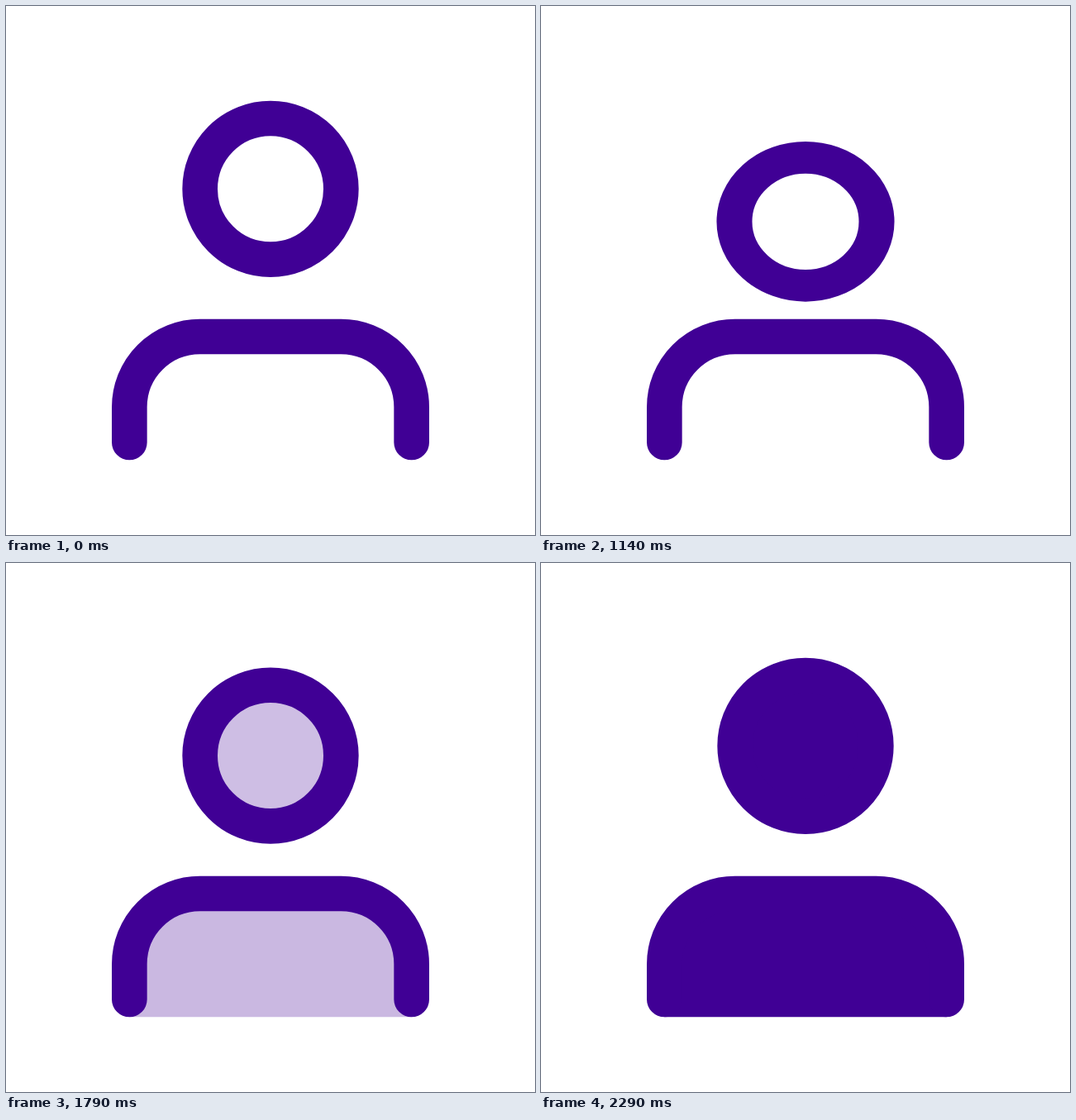
An HTML page for the animation above (2370 ms loop, 640x640 px).

```html
<!DOCTYPE html>
<html lang="en">
<head>
<meta charset="utf-8">
<title>Person icon</title>
<style>
  html, body { margin: 0; height: 100%; overflow: hidden; background: #fff; }
  svg { display: block; width: 100%; height: 100%; }
  path, circle { stroke-width: 42.667; stroke-linecap: round; stroke-linejoin: round; }
</style>
</head>
<body>
<svg viewBox="0 0 640 640" fill="#400095" stroke="#400095">
  <path id="torso" stroke="none" d="M149.33 549.33V485.33A85.33 85.33 0 0 1 234.67 400H405.33A85.33 85.33 0 0 1 490.67 485.33V549.33Z"/>
  <path id="shoulders" fill="none"/>
  <circle id="head" r="85.333"/>
</svg>
<script>
const LOOP = 2370, FPS = 14;
const [torso, shoulders, head] = ['torso', 'shoulders', 'head'].map(id => document.getElementById(id));

const progress = (t, from, to) => Math.min(1, Math.max(0, (t - from) / (to - from)));
const ease = p => p < 0.5 ? 2 * p * p : 1 - 2 * (1 - p) ** 2;

// Value at t through eased moves [from, to, target], one after another
const track = (t, start, moves) => moves.reduce(
  (v, [from, to, target]) => v + (target - v) * ease(progress(t, from, to)), start);

function shouldersPath(sag) {
  const y = 400 + sag, handle = 1.32 * sag;
  return `M149.33 528V485.33A85.33 85.33 0 0 1 234.67 400
    C234.67 400 ${320 - handle} ${y} 320 ${y}
    C${320 + handle} ${y} 405.33 400 405.33 400
    A85.33 85.33 0 0 1 490.67 485.33V528`;
}

function draw(t) {
  const y = track(t, 221.33, [[516, 973, 168.3], [973, 1273, 316.7], [1340, 1933, 221.33]]);
  const scale = squash => track(t, 1, [[516, 973, 0.9], [973, 1273, squash], [1273, 1533, 1]]);
  const sag = track(t, 0, [[1140, 1273, 43.2], [1300, 1713, 0]]);

  head.setAttribute('transform', `translate(320 ${y}) scale(${scale(1.0735)} ${scale(0.912)})`);
  head.setAttribute('fill-opacity', progress(t, 1633, 2233));
  torso.setAttribute('fill-opacity', progress(t, 1600, 2267));
  shoulders.setAttribute('d', shouldersPath(sag));
}

function tick() {
  const t = performance.now() % LOOP;
  draw(Math.floor((t + 5) * FPS / 1000) * 1000 / FPS % LOOP);
  requestAnimationFrame(tick);
}
tick();
</script>
</body>
</html>
```
